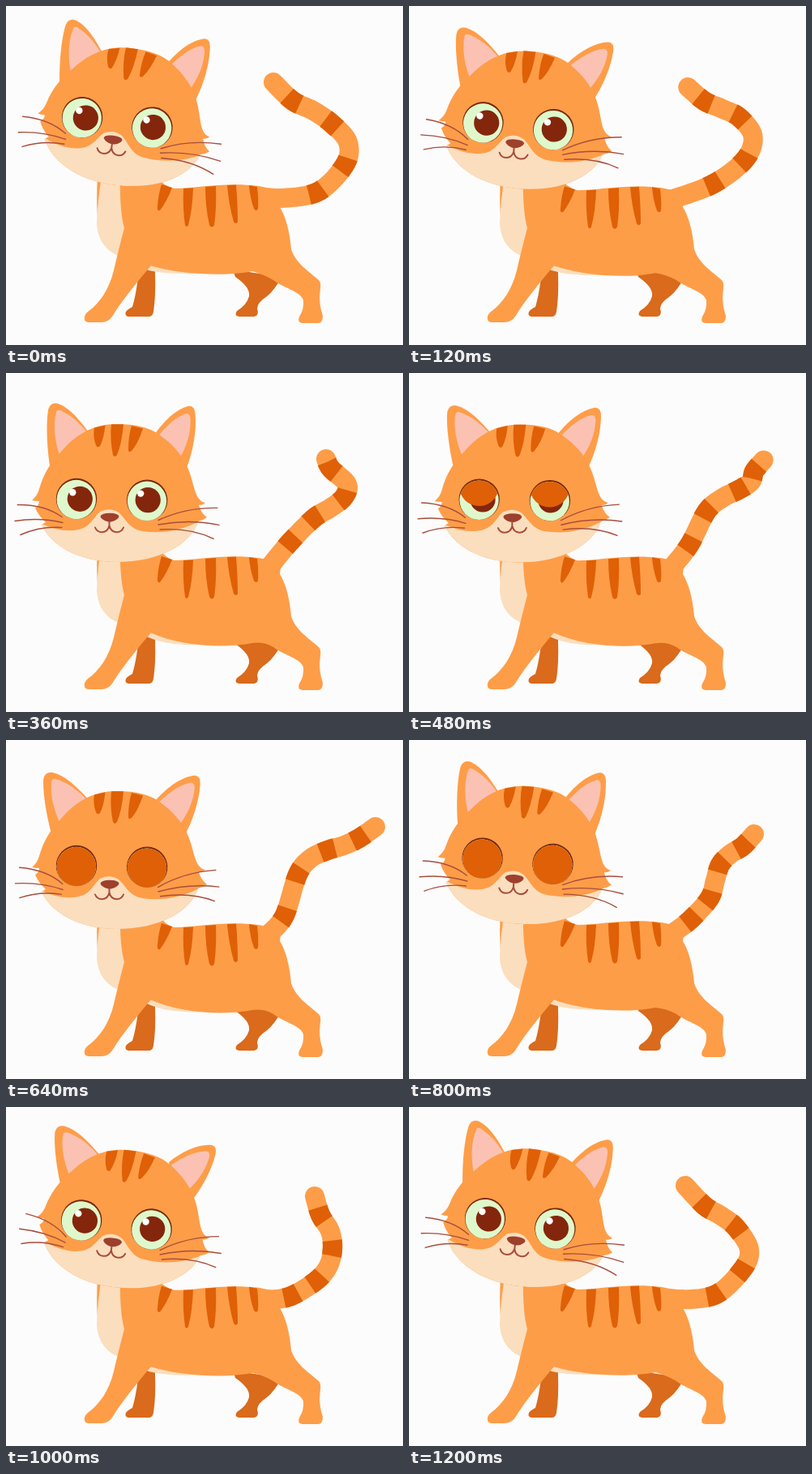
Recreate the animation shown at these times as an HTML page. Size 490 by 418 pixels, loop 1240 ms.

```html
<!DOCTYPE html>
<html lang="en">
<head>
<meta charset="utf-8">
<title>Walking cat</title>
<style>
  html, body { margin: 0; width: 100%; height: 100%; overflow: hidden; background: #fcfcfc; }
  svg { display: block; width: 100vw; height: 100vh; }
  .fur { fill: #fe9d48; }
  .cream { fill: #fbdebd; }
  .far { fill: #da6a1c; }
  .mark { fill: #df6006; }
  .pink { fill: #fbc2b4; }
  .line { fill: none; stroke: #a84d3d; stroke-width: 1.4; stroke-linecap: round; }
  .tail { fill: none; stroke: #fe9d48; stroke-width: 24; stroke-linecap: round; stroke-linejoin: round; }
  .band { fill: none; stroke: #df6006; stroke-width: 24.4; stroke-linejoin: round; }
</style>
</head>
<body>
<svg viewBox="0 0 490 418">
  <defs>
    <clipPath id="skull"><use href="#face"/></clipPath>
    <clipPath id="eyes"><circle cx="86.8" cy="156" r="24.2"/><circle cx="174" cy="157.8" r="24.2"/></clipPath>
  </defs>

  <path class="far" d="M162 318H184V330Q185 358 182 377Q181 383 176 383H151Q146 382 148 377Q150 374 156 371Q160 358 163 335Z"/>
  <path class="far" d="M280 325L340 334Q332 350 322 358Q310 366 310 373Q313 382 306 383H288Q281 382 285 376Q297 369 300 358Q302 347 283 334Z"/>

  <path id="tail" class="tail"/>
  <g id="bands"></g>

  <path class="fur" d="M113 210H150V290H118Q110 262 113 210Z"/>
  <path id="chest" class="cream"/>
  <path id="body" class="fur"/>
  <path class="fur" d="M147 270Q139 300 133 326C127 350 116 366 101 377Q96 381 97 386Q97 390 103 390H118Q126 390 131 383C144 362 158 345 180 319L200 280Z"/>
  <g id="stripes" class="mark">
    <path d="M192 220L205 224Q198 242 190 252Q186 253 187 247Q188 232 192 220Z"/>
    <path d="M219 225L231 224.5Q230 252 225 270Q223 274 221 270Q218 250 219 225Z"/>
    <path d="M246 223L259 222Q260 250 257 270Q254 275 251 270Q246 248 246 223Z"/>
    <path d="M273 221L284 220.5Q286 245 286 266Q284 270 281 266Q275 245 273 221Z"/>
    <path d="M300 221L310 223Q312 240 311 250Q309 254 306 250Q301 236 300 221Z"/>
  </g>

  <g id="head">
    <g id="earL">
      <path class="fur" d="M54 116C50 88 50 58 53 44Q56 35 65 37.500C80 43 93 60 104 76L90 110Z"/>
      <path class="pink" d="M67 104C60 84 58 62 63 47Q65 44 70 47C82 53 93 63 102 76L85 100Z"/>
    </g>
    <g id="earR">
      <path class="fur" d="M182 78C194 59 210 44 225 40.500Q232 40 233 50C235 72 231 95 223 118L200 110Z"/>
      <path class="pink" d="M186 80C198 65 208 55 221 50Q226 49 227 56C228 74 223 90 214 106L200 100Z"/>
    </g>
    <path id="face" class="fur" d="M137 63C160 63 177 67 189 76C205 87 216 100 222 112C230 128 231 142 236 152Q240 159 246 160Q243 163 238 163Q241 173 248 178Q243 182 237 183C228 211 190 233 137 233C90 233 56 213 44 187L49 184Q40 176 36 166Q41 163 41 158Q36 158 32 157Q39 151 41 143C46 125 55 110 68 97C86 76 107 63 137 63Z"/>
    <path class="cream" clip-path="url(#skull)" d="M40 184Q68 198 90 193C104 190 108 178 116 171Q128 165 139 172C148 180 152 192 168 195C190 198 215 196 242 181V240H40Z"/>
    <g class="mark">
      <path d="M109 67.500L122.500 64.500Q121 80 116 90Q113 93 111 89Q107 78 109 67.500Z"/>
      <path d="M130 63.200L145 63.300Q143 87 137 101Q134 105 132 101Q128 82 130 63.200Z"/>
      <path d="M155 65L169 68.500Q163 87 155 96Q151 99 151 94Q151 78 155 65Z"/>
    </g>
    <g id="eyeBalls"></g>
    <g clip-path="url(#eyes)"><g id="lids" class="mark"><circle cx="86.800" cy="156.200" r="24.500"/><circle cx="174" cy="158" r="24.500"/></g></g>
    <path fill="#9d402d" d="M128 172.800Q139 173 139.500 177C138 181 132 183.500 128 183.500S118 181 116.500 177Q117 173 128 172.800Z"/>
    <path class="line" style="stroke-width:2" d="M110 190.500C113 198 125 199 127.500 188V183V188C130 199 142 198 145 190.500"/>
    <g id="whiskL" class="line"><path d="M14 163Q47 162 69 177.500"/><path d="M11 183Q42 178 70 184.500"/><path d="M18 200Q42 189 69 190.500"/></g>
    <g id="whiskR" class="line"><path d="M188 181.500Q222 166 261 167"/><path d="M188 187Q226 180 263 188"/><path d="M190 193Q228 191 256 205"/></g>
  </g>
</svg>
<script>
const LOOP = 1240, STEP = 40;
const $ = id => document.getElementById(id);
const set = (id, name, value) => $(id).setAttribute(name, value);

// time, then head drop
const DROP = [[0, 0], [200, .6], [360, 1], [500, 1.04], [640, 1], [800, .48], [1000, .13], [1200, 0]];
// time, then twitch of ears and whiskers
const TWITCH = [[0, 0], [200, 1], [360, .06], [400, 0], [580, 1], [640, .66], [800, 0], [1000, 1], [1200, 0]];
// time, then x,y pairs along the tail from first band to tip
const TAIL = [
  [0,    383,230, 418,196, 422,168, 402,145, 379,129, 354,117, 330,94],
  [200,  369,213, 408,186, 423,159, 412,136, 394,127, 375,118, 358,104],
  [360,  351,208, 380,179, 401,166, 417,153, 421,137, 401,118, 395,106],
  [560,  345,214, 361,166, 378,146, 400,136, 420,131, 440,123, 462,108],
  [640,  344,216, 360,166, 376,146, 397,136, 417,130, 436,121, 456,107],
  [800,  348,221, 371,195, 378,173, 384,154, 396,141, 412,131, 426,116],
  [1000, 352,233, 383,214, 398,196, 403,174, 400,153, 388,133, 381,110],
  [1200, 377,232, 411,201, 420,176, 404,149, 385,134, 365,122, 341,97]
];
const ROOT = [326, 238];
const BAND_KNOTS = [1, 2, 4, 6];
const BAND_HALF = 9.5;
const SAMPLES = 12;

const hermite = (a, b, ma, mb, u) => {
  const v = u * u, w = v * u;
  return (2 * w - 3 * v + 1) * a + (w - 2 * v + u) * ma + (3 * v - 2 * w) * b + (w - v) * mb;
};

// Smooth looping interpolation of the values in each key
function valuesAt(keys, t) {
  const n = keys.length;
  const key = i => {
    const turn = Math.floor(i / n), k = keys[i - turn * n];
    return [k[0] + turn * LOOP, ...k.slice(1)];
  };
  let i = n - 1;
  while (keys[i][0] > t) i--;
  const [p, a, b, q] = [-1, 0, 1, 2].map(d => key(i + d));
  const span = b[0] - a[0], u = (t - a[0]) / span;
  return a.slice(1).map((v, j) => {
    const c = j + 1;
    const ma = (b[c] - p[c]) / (b[0] - p[0]) * span;
    const mb = (q[c] - a[c]) / (q[0] - a[0]) * span;
    return hermite(v, b[c], ma, mb, u);
  });
}

function curveThrough(knots) {
  const last = knots.length - 1, out = [];
  const knot = i => knots[Math.max(0, Math.min(last, i))];
  for (let i = 0; i < last; i++) {
    const [p, a, b, q] = [i - 1, i, i + 1, i + 2].map(knot);
    for (let s = 0; s < SAMPLES; s++) {
      out.push([0, 1].map(c => hermite(a[c], b[c], (b[c] - p[c]) / 2, (q[c] - a[c]) / 2, s / SAMPLES)));
    }
  }
  return [...out, knots[last]];
}

const toPath = pts => 'M' + pts.map(p => p.map(v => v.toFixed(2)).join(' ')).join('L');

// Walks from one sample until the wanted length is covered
function walk(pts, from, dir, length) {
  const out = [];
  for (let i = from; pts[i + dir]; i += dir) {
    const [a, b] = [pts[i], pts[i + dir]];
    const d = Math.hypot(b[0] - a[0], b[1] - a[1]);
    if (d >= length) {
      out.push(a.map((v, c) => v + (b[c] - v) * length / d));
      break;
    }
    out.push(b);
    length -= d;
  }
  return out;
}

function drawTail(t) {
  const flat = valuesAt(TAIL, t), knots = [ROOT];
  for (let i = 0; i < flat.length; i += 2) knots.push([flat[i], flat[i + 1]]);
  const pts = curveThrough(knots);
  set('tail', 'd', toPath(pts));
  BAND_KNOTS.forEach((k, i) => {
    const mid = k * SAMPLES;
    const band = [...walk(pts, mid, -1, BAND_HALF).reverse(), pts[mid], ...walk(pts, mid, 1, BAND_HALF)];
    bands[i].setAttribute('d', toPath(band));
  });
}

function drawBody(drop) {
  const y = v => (v + 6 * drop).toFixed(2);
  set('stripes', 'transform', `translate(0 ${y(0)})`);
  set('chest', 'd', `M118 210H160V300L180 312Q215 ${y(324)} 262 ${y(328)}Q205 ${y(333)} 176 326L146 310
    C126 306 113 290 112 268Q113 240 118 210Z`);
  set('body', 'd', `M141 210H186Q194 ${y(222)} 208 ${y(225)}C235 ${y(225)} 270 ${y(217)} 312 ${y(222)}
    Q326 ${y(226)} 340 ${y(225)}L338 248Q349 266 352 300C358 318 374 327 386 338Q389 341 388 348
    C386 364 388 372 391 382Q391 391 385 391H366Q359 390 362 383Q368 374 367 363
    C364 352 345 349 330 338Q318 331 304 ${y(327)}C270 ${y(334)} 215 ${y(331)} 178 320L146 300V274Q140 252 141 210Z`);
}

function drawHead(t, drop) {
  const up = 1 - drop;
  set('head', 'transform', `translate(${4 * up} ${-13 * up}) rotate(${7 * up} 128 178)`);
  const [twitch] = valuesAt(TWITCH, t);
  set('earL', 'transform', `rotate(${-12 * twitch} 80 95)`);
  set('earR', 'transform', `rotate(${13.5 * twitch} 208 95)`);
  set('whiskL', 'transform', `rotate(${9 * twitch} 70 185)`);
  set('whiskR', 'transform', `rotate(${-8 * twitch} 188 187)`);
  const shut = Math.max(0, Math.min(1, (t - 400) / 120, (960 - t) / 120));
  set('lids', 'transform', `translate(0 ${-52 * (1 - shut)})`);
}

function draw(t) {
  const [drop] = valuesAt(DROP, t);
  drawTail(t);
  drawBody(drop);
  drawHead(t, drop);
}

const circle = (x, y, r, fill) => `<circle cx="${x}" cy="${y}" r="${r}" fill="${fill}"/>`;
const eye = (x, y, px, py) =>
  circle(x, y, 25.2, '#78290c') + circle(x - .2, y + 1, 24.2, '#def8cc') +
  circle(px, py, 15.6, '#84260c') + circle(px - 9, py - 8, 4.2, '#fff');
$('eyeBalls').innerHTML = eye(87, 155, 91.3, 155.3) + eye(174.2, 156.8, 175.2, 156.6);
$('bands').innerHTML = BAND_KNOTS.map(() => '<path class="band"/>').join('');
const bands = $('bands').children;

// Steps of 40 ms, with two poses held twice as long
function stepTime(now) {
  const t = Math.floor(now % LOOP / STEP) * STEP;
  return t === 40 || t === 1040 ? t - STEP : t;
}

function tick() {
  draw(stepTime(performance.now()));
  requestAnimationFrame(tick);
}
tick();
</script>
</body>
</html>
```
